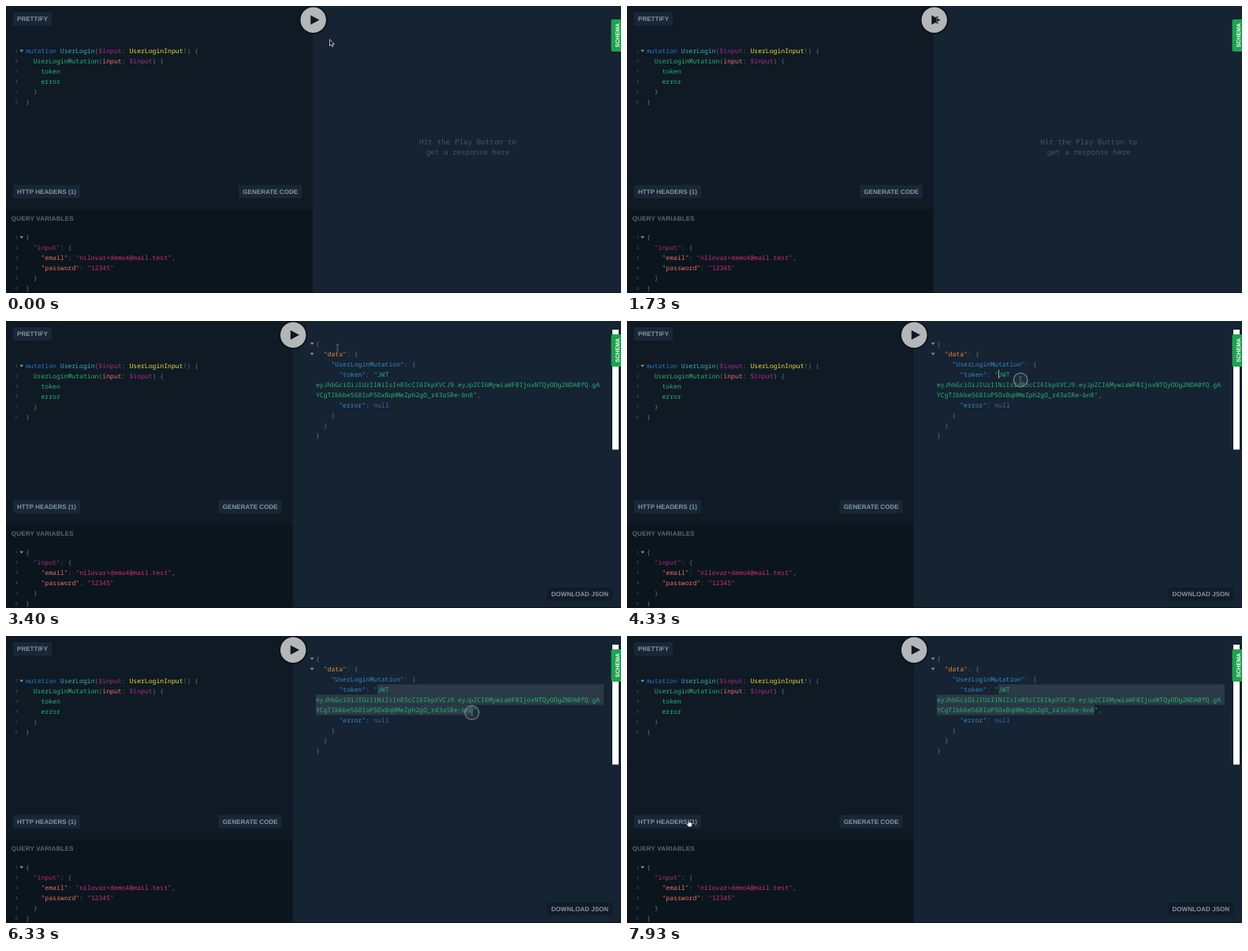
An HTML page that plays this animation: 780 by 365 pixels, repeating every 8 s.

```html
<!DOCTYPE html>
<html lang="en">
<head>
<meta charset="utf-8">
<title>API playground</title>
<style>
  html, body { margin: 0; width: 100%; height: 100%; overflow: hidden; background: #152332; }
  svg { display: block; width: 780px; height: 365px; }
  text { white-space: pre; text-rendering: geometricPrecision; font-kerning: none; font-variant-ligatures: none; }
  .code { font: 8.125px "Noto Sans Mono", monospace; }
  .num { font: 5.6px "Noto Sans Mono", monospace; fill: #46525c; text-anchor: middle; }
  .label { font: bold 8px "Liberation Sans", Arial, sans-serif; letter-spacing: .05px; fill: #8b949c; }
  .hint { font: 9.3px "Noto Sans Mono", monospace; fill: #465563; text-anchor: middle; }
  .button { fill: #172737; }
  .fold { fill: #8b949b; }
  .key { fill: #2a76c4; }
  .def { fill: #37b1b6; }
  .var { fill: #a92a80; }
  .type { fill: #e9dc2c; }
  .attr { fill: #e66f62; }
  .prop { fill: #2bb070; }
  .punc { fill: #68737c; }
  .value { fill: #cf2c7c; }
  .data { fill: #e58a38; }
  .field { fill: #3689c7; }
  .null { fill: #3b69a5; }
</style>
</head>
<body>
<svg viewBox="0 0 780 365">
  <rect width="780" height="365" fill="#152332"/>
  <rect y="364" width="780" height="1" fill="#0b151e"/>

  <g id="hint">
    <text class="hint" x="585.7" y="176">Hit the Play Button to</text>
    <text class="hint" x="585.7" y="189">get a response here</text>
  </g>

  <g id="spinner" fill="none" stroke-width="3">
    <circle cx="586" cy="179" r="8.3" stroke="#2b3947"/>
    <path id="arc" d="M594.3 179A8.3 8.3 0 0 1 586 187.3" stroke="#8f979d"/>
  </g>

  <g id="response">
    <g id="selection" fill="#2a3a46"><rect/><rect/><rect/></g>
    <rect x="769" y="11" width="8" height="152.500" fill="#fff"/>
  </g>

  <g id="download">
    <rect x="686.500" y="339" width="82.500" height="16.500" rx="1.500" fill="#101c28"/>
    <text class="label" x="691.500" y="349.900">DOWNLOAD JSON</text>
  </g>

  <path d="M780 17H769.500a2 2 0 0 0-2 2V56a2 2 0 0 0 2 2H780Z" fill="#1fa350"/>
  <text transform="translate(777.500 52.500) rotate(-90)" class="label" style="font-size:7px;fill:#fff">SCHEMA</text>

  <g id="pane">
    <rect width="389" height="365" fill="#0f1a25"/>
    <rect y="259" width="389" height="106" fill="#0b151d"/>
    <rect class="button" x="295" y="227.500" width="80" height="17" rx="1.500"/>
    <text class="label" x="300.300" y="238.900">GENERATE CODE</text>
    <circle cx="389.700" cy="17.700" r="18.300" fill="#0b151e"/>
    <circle cx="389.700" cy="17.700" r="16.200" fill="#b4b6b8"/>
    <path d="M386.300 11.700L397.500 17.700L386.300 23.700Z" fill="#0d1822"/>
  </g>

  <g id="query">
    <rect class="button" x="9" y="8" width="49" height="17" rx="1.500"/>
    <text class="label" x="14" y="19.400">PRETTIFY</text>
    <rect class="button" x="9" y="227.500" width="85" height="17" rx="1.500"/>
    <text class="label" x="14" y="238.900">HTTP HEADERS (1)</text>
    <text class="label" x="6.700" y="273" style="letter-spacing:.22px;fill:#5d666e">QUERY VARIABLES</text>
  </g>

  <rect id="caret" width="1" height="11" fill="#a9b1b7"/>

  <g id="mouse">
    <circle id="ring" r="8.800" fill="#8b979f" fill-opacity=".1" stroke="#7d8a90" stroke-opacity=".8" stroke-width="1.500"/>
    <path id="arrow" d="M0 0V8.200L1.900 6.500L3.200 9.300L4.500 8.700L3.300 6H5.900Z" fill="#0a0d10" stroke="#d9dcde" stroke-width=".8" stroke-linejoin="round"/>
    <g id="beam" fill="none">
      <path d="M-1.600-4Q0-4 0-3Q0-4 1.600-4M0-3V3M-1.600 4Q0 4 0 3Q0 4 1.600 4" stroke="#7c868d" stroke-width="1.600"/>
      <path d="M-1.600-4Q0-4 0-3Q0-4 1.600-4M0-3V3M-1.600 4Q0 4 0 3Q0 4 1.600 4" stroke="#11171c" stroke-width=".7"/>
    </g>
    <path id="hand" d="M-1.800-4.500Q-1-5.400-.3-4.400V-1.200L2.800-.6Q3.900-.3 3.800 1L3 4.800H-1.200L-3.500 1.300Q-3.400.1-1.800 1Z" fill="#f4f5f5" stroke="#161b20" stroke-width=".7"/>
  </g>
</svg>
<script>
const $ = id => document.getElementById(id);
const NS = 'http://www.w3.org/2000/svg';
const LOOP = 8000, CHAR = 4.875, LINE = 13;
const CLICK = 2350, ANSWER = 2930, PRESS = 4150, DRAG = 4360, RELEASE = 6700;
const TEXT_X = 393, TOKEN_X = 471, TEXT_END = 758;

function add(parent, tag, attrs, content = '') {
  const node = document.createElementNS(NS, tag);
  for (const name in attrs) node.setAttribute(name, attrs[name]);
  node.textContent = content;
  return parent.appendChild(node);
}

// Each row: indent in characters, then pairs of class and text.
function codeBlock(parent, x, firstY, rows) {
  rows.forEach(([indent, ...parts], i) => {
    const text = add(parent, 'text', { class: 'code', x: x + indent * CHAR, y: firstY + i * LINE + 2.8 });
    for (let p = 0; p < parts.length; p += 2) add(text, 'tspan', { class: parts[p] }, parts[p + 1]);
  });
}

const fold = (parent, x, y) =>
  add(parent, 'path', { class: 'fold', d: `M${x} ${y - 1.3}h4.800l-2.400 3z` });

function gutter(firstY) {
  for (let i = 0; i < 6; i++) add($('query'), 'text', { class: 'num', x: 13.5, y: firstY + i * LINE + 2 }, i + 1);
  fold($('query'), 17.3, firstY);
}

gutter(57);
codeBlock($('query'), 25, 57, [
  [0, 'key', 'mutation ', 'def', 'UserLogin', 'punc', '(', 'var', '$input', 'punc', ': ', 'type', 'UserLoginInput', 'punc', '!) {'],
  [2, 'prop', 'UserLoginMutation', 'punc', '(', 'attr', 'input', 'punc', ': ', 'var', '$input', 'punc', ') {'],
  [4, 'prop', 'token'],
  [4, 'prop', 'error'],
  [2, 'punc', '}'],
  [0, 'punc', '}']
]);

gutter(294);
codeBlock($('query'), 25, 294, [
  [0, 'punc', '{'],
  [2, 'var', '"input"', 'punc', ': {'],
  [4, 'attr', '"email"', 'punc', ': ', 'value', '"nilovar+demo4@mail.test"', 'punc', ','],
  [4, 'attr', '"password"', 'punc', ': ', 'value', '"12345"'],
  [2, 'punc', '}'],
  [0, 'punc', '}']
]);

fold($('response'), 385.7, 28.7);
fold($('response'), 385.7, 41.7);
codeBlock($('response'), TEXT_X, 28.7, [
  [0, 'punc', '{'],
  [2, 'data', '"data"', 'punc', ': {'],
  [4, 'field', '"UserLoginMutation"', 'punc', ': {'],
  [6, 'field', '"token"', 'punc', ': ', 'prop', '"JWT'],
  [0, 'prop', 'eyJhbGciOiJIUzI1NiIsInR5cCI6IkpXVCJ9.eyJpZCI6MywiaWF0IjoxNTQyODg2NDA0fQ.gA'],
  [0, 'prop', 'YCgTIbkbe568IoP5OxBqHMeZph2gO_r43aSRe-bn8"', 'punc', ','],
  [6, 'field', '"error"', 'punc', ': ', 'null', 'null'],
  [4, 'punc', '}'],
  [2, 'punc', '}'],
  [0, 'punc', '}']
]);

// Mouse stops: time, x, y
const path = [
  [70, 410.5, 42.5], [650, 292, 55], [1000, 292, 55], [1800, 395.5, 17], [3000, 395.5, 17],
  [4050, 472, 68], [PRESS, 472, 68], [4330, 499, 75], [5000, 574, 92], [5300, 591, 97.5],
  [6750, 591, 97.5], [7600, 79, 238]
];

function mouseAt(t) {
  const i = path.findIndex(stop => stop[0] > t);
  if (i < 1) return (i ? path[path.length - 1] : path[0]).slice(1);
  const [t0, x0, y0] = path[i - 1], [t1, x1, y1] = path[i];
  let k = (t - t0) / (t1 - t0);
  if (t < PRESS || t > RELEASE) k = k * k * (3 - 2 * k);
  return [x0 + (x1 - x0) * k, y0 + (y1 - y0) * k];
}

const show = (id, on) => { $(id).style.display = on ? '' : 'none'; };
const place = (id, x, y) => $(id).setAttribute('transform', `translate(${x} ${y})`);

// The selection trails the mouse a little.
function drawSelection(t) {
  const [x, y] = mouseAt(Math.min(t, RELEASE) - 134);
  const row = y < 74.5 ? 0 : y < 89 ? 1 : 2;
  const end = TEXT_X + Math.round((x - TEXT_X) / CHAR) * CHAR;
  [...$('selection').children].forEach((rect, i) => {
    const left = i ? TEXT_X : TOKEN_X;
    const right = i < row ? TEXT_END : i === row ? end : left;
    rect.setAttribute('x', left);
    rect.setAttribute('y', 61.5 + i * LINE);
    rect.setAttribute('width', Math.max(0, right - left));
    rect.setAttribute('height', LINE);
  });
}

function draw(t) {
  const answered = t >= ANSWER, loading = t >= CLICK && !answered;
  show('hint', t < CLICK);
  show('spinner', loading);
  show('download', t >= CLICK);
  show('response', answered);
  place('pane', answered ? -25.5 : 0, 0);
  $('arc').setAttribute('transform', `rotate(${(t - 2670) * 360 / 1100 + 8} 586 179)`);

  show('selection', t >= DRAG);
  drawSelection(t);

  const blink = t < CLICK && (t + LOOP - 450 - 7 * 1060) % 1060 < 530 && t >= 450;
  const pressed = t >= PRESS && t < DRAG;
  show('caret', blink || pressed);
  place('caret', pressed ? TOKEN_X : 25, pressed ? 62 : 51.5);
  if (blink) $('caret').setAttribute('transform', 'translate(25 51.5)');

  const [x, y] = mouseAt(t);
  const arrow = t < 900 && x > 389;
  const hand = t > RELEASE && x < 94 && y > 227;
  place('mouse', x, y);
  show('arrow', arrow);
  show('hand', hand);
  show('beam', !arrow && !hand);
  show('ring', t >= PRESS && t < RELEASE);
}

const start = performance.now();
function tick() {
  draw((performance.now() - start) % LOOP);
  requestAnimationFrame(tick);
}
tick();
</script>
</body>
</html>
```
